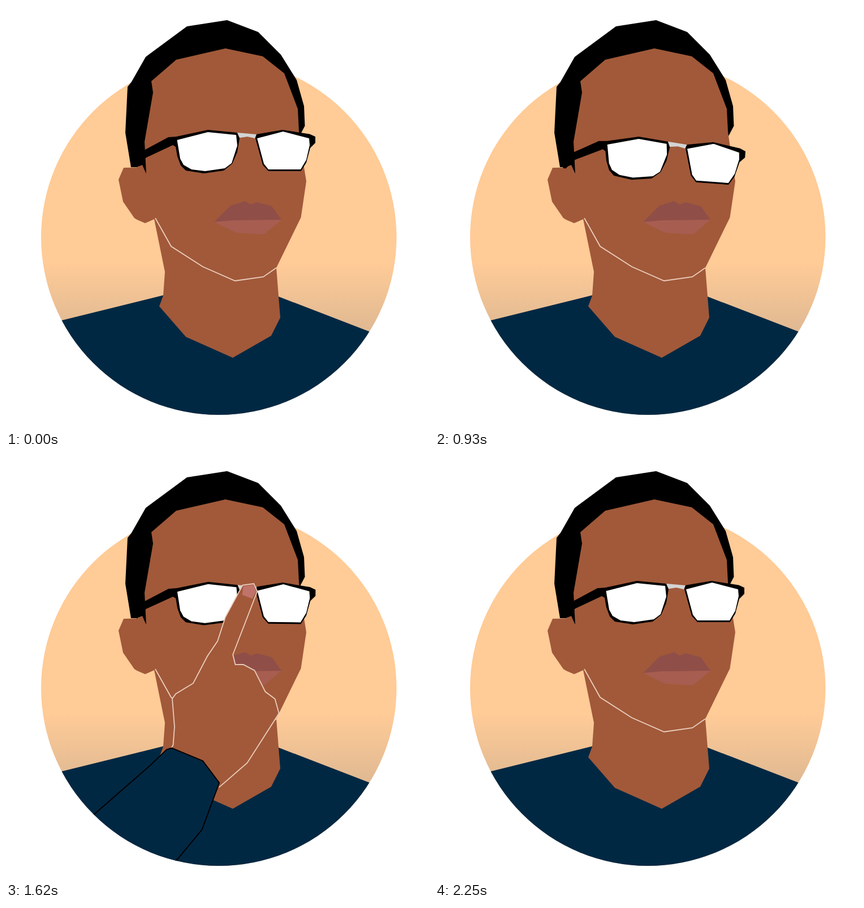
Recreate the animation shown at these times as an HTML page. Size 748 px wide and 748 px high, loop 2700 ms.

```html
<!DOCTYPE html>
<html lang="en">
<head>
<meta charset="utf-8">
<title>Pushing up the glasses</title>
<style>
  html, body { margin: 0; width: 100%; height: 100%; overflow: hidden; background: #fff; }
  svg { display: block; width: 100%; height: 100%; }
  .skin { fill: #a15939; }
  .navy { fill: #012843; }
  .line { stroke: #ebcdbd; stroke-width: 1.8; }
</style>
</head>
<body>
<svg viewBox="0 0 748 748">
  <defs>
    <linearGradient id="sky" gradientUnits="userSpaceOnUse" x1="0" y1="455" x2="0" y2="580">
      <stop offset="0" stop-color="#ffcb97"/>
      <stop offset="1" stop-color="#deb892"/>
    </linearGradient>
    <clipPath id="disc"><circle cx="376.3" cy="408.8" r="314.3"/></clipPath>
  </defs>

  <g clip-path="url(#disc)">
    <path fill="url(#sky)" d="M60 90H695V730H60z"/>
    <path class="navy" d="M60 565.5L278 511.5H476L700 598V730H60z"/>
  </g>

  <!-- head and neck -->
  <path d="M215 143L222 134 247 90 320 36 391 25 446 46 486 86 514 131 527 177 528.5 212 518 232 400 240 248 297 240 282 231 285 221 285 211 224z"/>
  <path class="skin" d="M245 240L260 153 257 133 301 95 388 75 454 89 492 119 516 182 518 222 527 285 531 310 521.5 374 478 463 485 551 469 583 401 622 318 585 271 531 278 512 281 470 262 377 246 384 232 378 227 375 207 346 199 307 208 286 231 285.5 241 281 248 297z"/>
  <path fill="#904e48" d="M368 382L397 353 423 345 433 351 443 347 470 354 487 378 400 380z"/>
  <path fill="#a75d50" d="M368 382L400 379 487 378 456 404 407 401z"/>
  <path class="line" fill="none" d="M264 375L292 425 348 461 405 486 455 479 478 463"/>

  <g id="glasses">
    <path d="M287 232L301 231 357 219 409 224 413 234 409 258 400 279 385 291 350 296 318 291 309 282 303 266 300 249 295 246 248 268 232 285 227 284 228 265 246 254z"/>
    <path d="M442 227L489 219 537 226.500 547 231V242L538 251 531 277 521.500 292H464L454 281 441 234z"/>
    <path fill="#d4d4d4" d="M409 224L443 227 440 234 427 231 413 233z"/>
    <path fill="#fff" d="M302.500 237L357 223 407 228 409 247 399 278 387 287 352 292 328 289 314 281 308 270z"/>
    <path fill="#fff" d="M444 234L490 222 536 234 537 246 531 272 521 289H464L456 279z"/>
  </g>

  <g clip-path="url(#disc)">
    <g id="arm">
      <path class="skin line" d="M279 543L283 538 288 506V456L295 448 313 439 327 432 356 386 376 361 393 320 428 266 448 265 453 279 401 387 404 405 418 406 437 418 453 457 469 471 474 497 411 580 358 619"/>
      <path fill="#c0736a" d="M429 268L448 267 451 279 443 291 426 283z"/>
      <path class="navy" stroke="#000" stroke-width="2" d="M-40 778L157 632 238 572 271 545 280 543 333 570 359 611 322 691 150 868"/>
    </g>
  </g>
</svg>
<script>
const LOOP = 2700, TICK = 30, TURN = 4.575;
const glasses = document.getElementById('glasses');
const arm = document.getElementById('arm');
const ramp = (t, from, to) => Math.min(1, Math.max(0, (t - from) / (to - from)));

// turn and shift are counted in ticks away from the pushing pose
function poseArm(turn, shift) {
  arm.setAttribute('transform',
    `translate(${11.5 * (1 - shift)} ${21 * (shift - 1)}) rotate(${TURN * (turn - 1)} 188 521)`);
}

function draw(now) {
  const t = Math.floor(now % LOOP / TICK) * TICK;
  const drop = ramp(t, 480, 930) - ramp(t, 1440, 1650);
  glasses.setAttribute('transform', `rotate(${4.23 * drop} 196 271)`);

  arm.style.display = t >= 1200 && t < 2250 ? '' : 'none';
  if (t < 1980) {
    const left = Math.max(0, (1470 - t) / TICK);
    poseArm(left, left);
  } else {
    const gone = (t - 1980) / TICK;
    poseArm(gone, 2 * Math.max(0, gone - 1));
  }
}

const start = performance.now();
function frame() {
  draw(performance.now() - start);
  requestAnimationFrame(frame);
}
frame();
</script>
</body>
</html>
```
